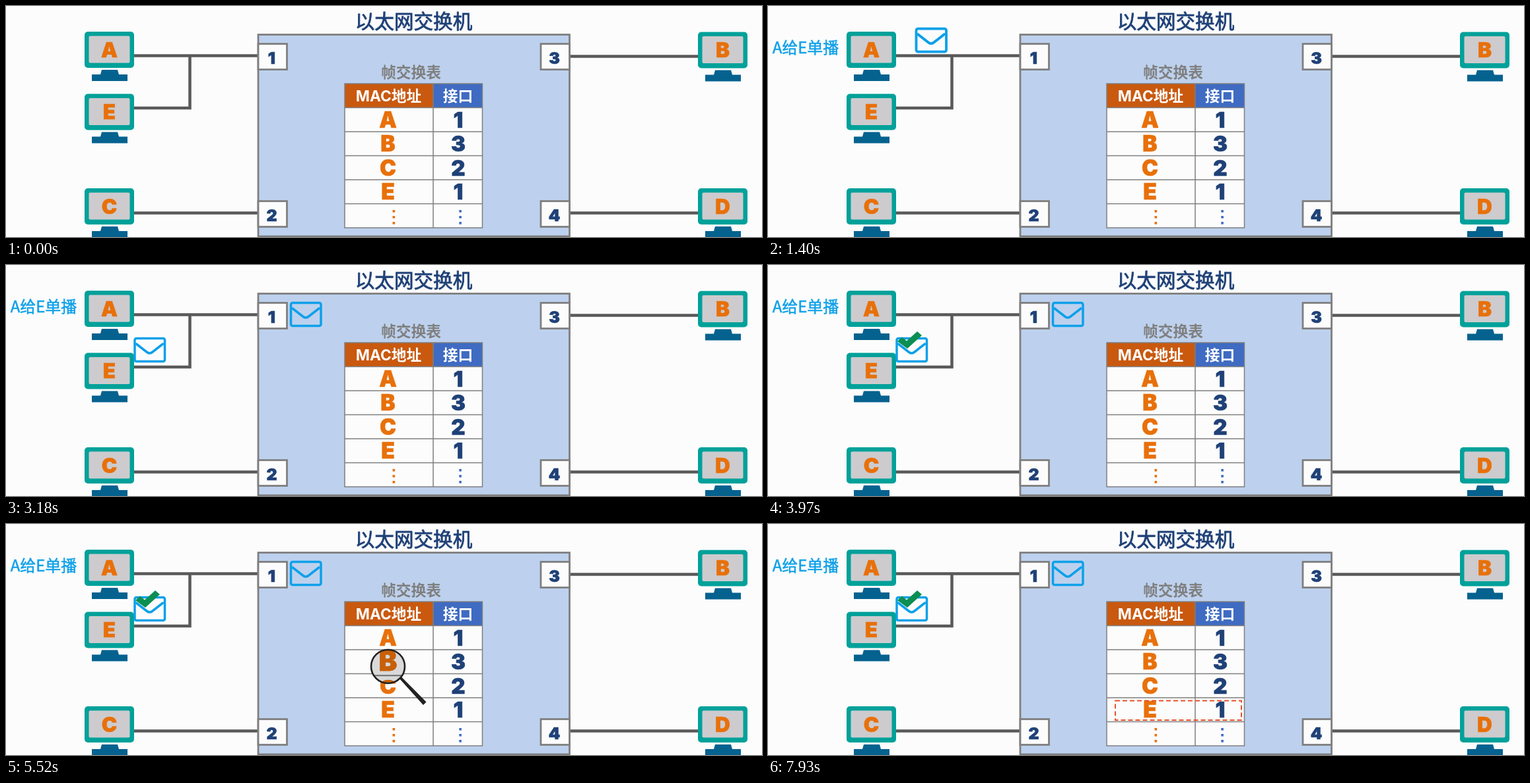
Write an HTML page that moves like this. It is 1145 by 351 pixels and loops after 8000 ms.

```html
<!DOCTYPE html>
<html lang="zh">
<head>
<meta charset="utf-8">
<title>以太网交换机</title>
<style>
  html, body { margin: 0; width: 100%; height: 100%; overflow: hidden; background: #fcfcfc; }
  svg { display: block; width: 1145px; height: 351px; }
  text { font-family: "Noto Sans CJK SC", "Noto Sans CJK", "Noto Sans", sans-serif; text-anchor: middle; }
  .heavy { font-family: Inter, Roboto, sans-serif; font-weight: 900; stroke-width: .6px; }
  .header { font-family: Inter, "Noto Sans CJK SC", "Noto Sans CJK", sans-serif; }
</style>
</head>
<body>
<svg viewBox="0 0 1145 351">
  <defs>
    <g id="computer">
      <rect width="75" height="55" rx="5" fill="#00a19a"/>
      <rect x="6.5" y="6.5" width="62" height="41" rx="2" fill="#cdcbce"/>
      <path d="M26 58H50L52 65H65V75H11V65H24Z" fill="#05628f"/>
    </g>
    <g id="envelope" fill="none" stroke="#0ea0e9" stroke-width="3.5" stroke-linejoin="round" stroke-linecap="round">
      <rect x="-22.5" y="-17.5" width="45.5" height="35" rx="2.5"/>
      <path d="M-20 -9L-4 3.5Q0 6.5 4 3.5L20 -9"/>
    </g>
    <clipPath id="glass"><circle r="25.5"/></clipPath>
  </defs>
  <g id="scene"></g>
  <text id="label" x="57" y="72" font-size="24" fill="#0ea0e9" stroke="#0ea0e9" stroke-width=".5">A给E单播</text>
  <use id="toSwitch" href="#envelope"/>
  <use id="toHost" href="#envelope"/>
  <path id="check" d="M196 116L203 109.5L210 115.5L226 101L233 107L211 127Z" fill="#0b8f52"/>
  <rect id="match" x="526" y="268.5" width="191" height="29.5" fill="none" stroke="#e8502a" stroke-width="2" stroke-dasharray="7 4"/>
  <g id="lens">
    <path d="M18 18L20 16.5L57 54L53.5 57.5Z" fill="#222" stroke="#222" stroke-width="1.5" stroke-linejoin="round"/>
    <g clip-path="url(#glass)"><use id="magnified" href="#scene"/></g>
    <circle r="25.5" fill="#000" fill-opacity=".14" stroke="#222" stroke-width="2.6"/>
  </g>
</svg>
<script>
const LOOP = 8000;
const ORANGE = '#e8700a', NAVY = '#1f4177', GRAY = '#7f7f7f';
const LENS_X = 578.5, ZOOM = 1.25;
const $ = id => document.getElementById(id);

const rect = (x, y, w, h, fill, stroke = 'none', width = 0) =>
  `<rect x="${x}" y="${y}" width="${w}" height="${h}" fill="${fill}" stroke="${stroke}" stroke-width="${width}"/>`;
const line = (d, color, width) =>
  `<path d="${d}" fill="none" stroke="${color}" stroke-width="${width}"/>`;
const heavy = (s, x, cy, size, fill) =>
  `<text class="heavy" x="${x}" y="${cy + size * .364}" font-size="${size}" fill="${fill}" stroke="${fill}">${s}</text>`;
const bold = (s, x, y, size, fill, kind = '') =>
  `<text class="${kind}" x="${x}" y="${y}" font-size="${size}" fill="${fill}" font-weight="700">${s}</text>`;

function computer(name, x, y) {
  return `<use href="#computer" x="${x}" y="${y}"/>` + heavy(name, x + 37.5, y + 27.5, 31.5, ORANGE);
}

function port(number, x, y) {
  return rect(x, y, 43.5, 39, '#fcfcfc', GRAY, 2.8) + heavy(number, x + 20.5, y + 21, 25, NAVY);
}

function table() {
  const rows = [['A', 1], ['B', 3], ['C', 2], ['E', 1]];
  let out = rect(513, 118, 208.5, 219, '#fcfcfc')
    + rect(513, 118, 134, 36.5, '#c9590f') + rect(647, 118, 74.5, 36.5, '#3f6bc2')
    + bold('MAC地址', 579.5, 144.5, 22.7, '#fff', 'header')
    + bold('接口', 684.5, 144.5, 22.7, '#fff', 'header');
  rows.forEach(([mac, number], i) => {
    const y = 172.8 + 36.4 * i;
    out += heavy(mac, 578.5, y, 33.5, ORANGE) + heavy(number, 685, y, 33, NAVY);
  });
  for (let i = 0; i < 3; i++) {
    out += rect(585.5, 310 + 9 * i, 3.6, 3.6, ORANGE) + rect(686.3, 310 + 9 * i, 3.6, 3.6, '#3f6bc2');
  }
  let grid = 'M513 118H721.5V337H513ZM647 118V337';
  for (let i = 1; i < 6; i++) grid += `M513 ${118 + 36.5 * i}H721.5`;
  return out + line(grid, GRAY, 1.5);
}

$('scene').innerHTML =
  line('M193 75.5H382M278.5 75.5V155H193M854 76.5H1049M193 314.5H382M854 314.5H1049', '#595959', 4.5)
  + rect(382, 43.5, 471.5, 306.5, '#bdd1ee', GRAY, 2.8)
  + port(1, 382, 57.5) + port(2, 382, 296.5) + port(3, 810, 57.5) + port(4, 810, 296.5)
  + computer('A', 119, 39) + computer('E', 119, 133.5) + computer('C', 119, 277)
  + computer('B', 1048, 39.5) + computer('D', 1048, 277)
  + `<text x="617.5" y="34" font-size="29.6" fill="${NAVY}" stroke="${NAVY}" stroke-width=".8">以太网交换机</text>`
  + bold('帧交换表', 613.5, 108.5, 22.8, GRAY)
  + table();

const ramp = (t, from, to) => Math.min(1, Math.max(0, (t - from) / (to - from)));
const ease = p => p * p * (3 - 2 * p);
const mix = (a, b, p) => a + (b - a) * p;
const place = (id, x, y) => $(id).setAttribute('transform', `translate(${x} ${y})`);
const fade = (id, opacity) => $(id).setAttribute('opacity', opacity);

// Each stop is [progress, x, y].
function along(stops, p) {
  const i = Math.max(1, stops.findIndex(s => s[0] >= p));
  const [a, b] = [stops[i - 1], stops[i]];
  const q = ramp(p, a[0], b[0]);
  return [mix(a[1], b[1], q), mix(a[2], b[2], q)];
}

const switchPath = [[0, 247, 52], [1, 454, 75]];
const hostPath = [[0, 247, 52], [.4, 283.5, 57], [.8, 283.5, 129], [1, 217.5, 129]];

function moveLens(y) {
  place('lens', LENS_X, y);
  $('magnified').setAttribute('transform', `scale(${ZOOM}) translate(${-LENS_X} ${-y})`);
}

function draw(t) {
  fade('label', ramp(t, 600, 1000));
  const sent = ramp(t, 900, 1300);
  fade('toSwitch', sent);
  fade('toHost', sent);
  const travel = ease(ramp(t, 1980, 3110));
  place('toSwitch', ...along(switchPath, travel));
  place('toHost', ...along(hostPath, travel));
  fade('check', ramp(t, 3350, 3650));
  moveLens(mix(173, 298.5, ease(ramp(t, 4925, 6430))));
  fade('lens', ramp(t, 4350, 4700) * (1 - ramp(t, 6600, 6900)));
  fade('match', ramp(t, 7000, 7350));
}

const start = performance.now();
function tick() {
  draw((performance.now() - start) % LOOP);
  requestAnimationFrame(tick);
}
draw(0);
requestAnimationFrame(tick);
</script>
</body>
</html>
```
